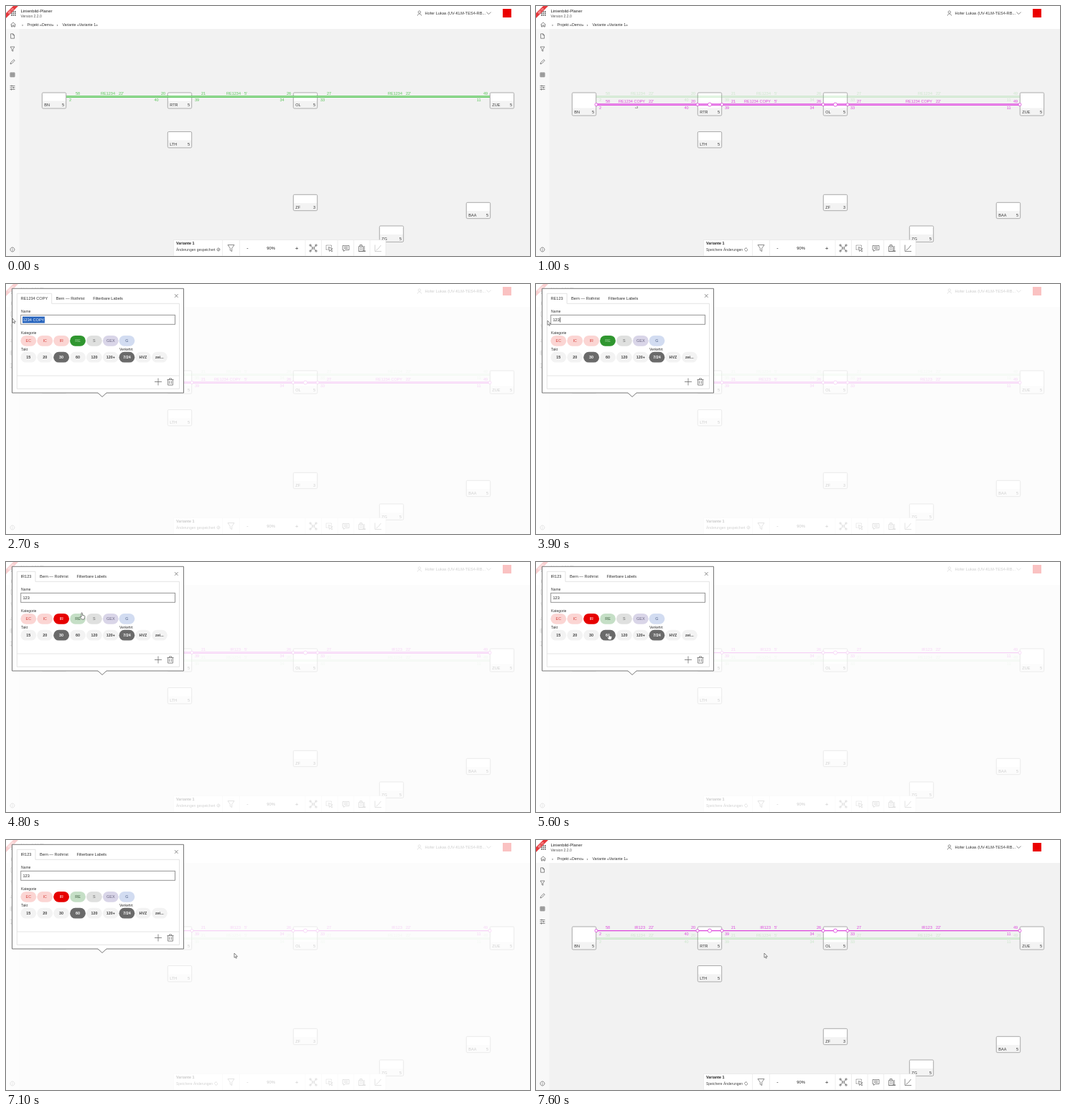
Recreate the animation shown at these times as an HTML page. Size 730 px wide and 349 px high, loop 7700 ms.

```html
<!DOCTYPE html>
<html lang="de">
<head>
<meta charset="utf-8">
<title>Linienbild-Planer</title>
<style>
html, body { margin: 0; width: 100%; height: 100%; overflow: hidden; background: #fff; }
svg { position: fixed; left: 0; top: 0; display: block; }
text { font-family: "Liberation Sans", Arial, sans-serif; white-space: pre; }
.icon { fill: none; stroke: #666; stroke-width: .75; }
</style>
</head>
<body>
<svg width="730" height="349" viewBox="0 0 730 349">
  <g id="page"></g>
  <g id="net"></g>
  <g id="bar"></g>
  <rect id="veil" width="730" height="349" fill="#fff"/>
  <g id="dialog"></g>
  <g id="pointer"></g>
</svg>
<script>
const LOOP = 7700, STEP = 100;
const COPY = 600, OPEN = 1200, SAVED = 1600, DRAG = 2100, DRAG_END = 2500;
const TYPE = [3300, 3500, 3700], PICK_IR = 4400, PICK_60 = 5300, CLOSE = 7200;
const PINK = '#dc45dc', GREEN = '#55c455';
const ROW1 = 126.6, ROW2 = 137.6;

const layer = id => document.getElementById(id);
const pen = document.createElement('canvas').getContext('2d');
function widthOf(s, size) {
  pen.font = '100px "Liberation Sans", Arial, sans-serif';
  return pen.measureText(s).width * size / 100;
}

// y is the vertical middle of the capitals
function text(s, x, y, size = 5.7, fill = '#333', extra = '') {
  return `<text x="${x}" y="${y + size * .36}" font-size="${size}" fill="${fill}" ${extra}>${s}</text>`;
}
const MID = 'text-anchor="middle"', END = 'text-anchor="end"', BOLD = 'font-weight="bold"';
function rect(x, y, w, h, fill, extra = '') {
  return `<rect x="${x}" y="${y}" width="${w}" height="${h}" fill="${fill}" ${extra}/>`;
}
function icon(x, y, d, extra = '') {
  return `<path class="icon" transform="translate(${x} ${y})" d="${d}" ${extra}/>`;
}
function line(x1, y1, x2, y2, color, w = 1) {
  return `<path d="M${x1} ${y1}L${x2} ${y2}" stroke="${color}" stroke-width="${w}" fill="none"/>`;
}
function ring(x, y, r, color) {
  return `<circle cx="${x}" cy="${y}" r="${r}" fill="#fff" stroke="${color}" stroke-width=".8"/>`;
}

const FUNNEL = 'M-3-3H3L.8.2V3.2L-.8 2.4V.2Z';

function drawPage() {
  let dots = '';
  for (let i = 0; i < 9; i++)
    dots += rect(7 + i % 3 * 2.5, 7 + Math.floor(i / 3) * 2.5, 1.6, 1.6, '#555');
  return rect(0, 0, 730, 349, '#f2f2f2') + rect(0, 0, 730, 32, '#fff') + rect(0, 32, 18.5, 317, '#f8f8f8') +
    dots +
    '<path d="M0 10L10 0H17L0 17Z" fill="#e5383c"/>' +
    text('BETA', 0, 0, 4, '#fff', `${MID} transform="translate(6.7 6.7) rotate(-45)"`) +
    text('Linienbild-Planer', 20.5, 7, 5.9, '#222') +
    text('Version 2.2.0', 20.5, 14.5, 5, '#555') +
    icon(576, 10, 'M-2.5 3.5C-2.5 0 2.5 0 2.5 3.5M0-3.2A1.7 1.7 0 1 1-.1-3.2Z') +
    text('Hofer Lukas (UV-KLM-TES4-RB...', 583.5, 10, 5.6) +
    icon(672.5, 10, 'M-3-1.5L0 1.5L3-1.5') +
    rect(692, 4, 12, 12, '#eb0000') +
    icon(10, 26, 'M-3.5 0L0-3L3.5 0M-2.5-.5V3H-.8V.8H.8V3H2.5V-.5') +
    text('›', 22, 25.6, 6) + text('Projekt «Demo»', 29.5, 26, 5.2) +
    text('›', 70.5, 25.6, 6) + text('Variante «Variante 1»', 78.5, 26, 5.2) +
    icon(9, 42, 'M-2.4-3.2H.8L2.6-1.2V3.2H-2.4ZM.8-3.2V-1.2H2.6') +
    icon(9, 60, FUNNEL) +
    icon(9, 78, 'M-3 3L-2.3.8L1.8-3.2L3.2-1.8L-.8 2.3Z') +
    icon(9, 96, 'M-3-2.8H3V2.8H-3ZM-3-.9H3M-3 .9H3M-1-2.8V2.8M1-2.8V2.8', 'stroke-width=".6"') +
    icon(9, 114, 'M-3.5-2.5H3.5M-3.5 0H3.5M-3.5 2.5H3.5M-1-3.6V-1.4M1.5-1.1V1.1M-1.5 1.4V3.6') +
    icon(9, 340, 'M0-3A3 3 0 1 1-.1-3ZM0-.5V1.6M0-1.7V-1.1');
}

function drawNode([name, x, y, time], h) {
  return rect(x + .3, y, 33.4, h, '#fff', 'rx="1.5"') +
    rect(x + .8, y + h - 10.5, 32.4, 10, '#f3f3f3') +
    rect(x + .3, y, 33.4, h, 'none', 'rx="1.5" stroke="#a6a6a6" stroke-width=".95"') +
    text(name, x + 3.3, y + h - 4.8, 5.5, '#333') + text(time, x + 31, y + h - 4.8, 5.5, '#333', END);
}

const HUBS = [['BN', 50, 121, 5], ['RTR', 225, 121, 5], ['OL', 400, 121, 5], ['ZUE', 674, 121, 5]];
const OTHERS = [['LTH', 225, 175.5, 5], ['ZF', 400, 263.3, 3], ['BAA', 641, 274.3, 5], ['ZG', 520, 307, 5]];
// start x, end x, departure, arrival, return arrival, return departure, minutes, name end
const LEGS = [
  [84, 225, 58, 20, 2, 40, 22, 152],
  [259, 400, 21, 26, 39, 34, 5, 327],
  [434, 674, 27, 49, 33, 11, 22, 552]
];

function drawTrain(name, y, color, { thick = true, picked = false, faded = false }) {
  let s = line(84, y, 674, y, color, thick ? 2.8 : 1.3);
  if (thick) s += line(84, y, 674, y, '#fff', .5);
  for (const [a, b, dep, arr, back, from, min, end] of LEGS) {
    const up = y - 4.7, down = y + 4.5;
    s += text(dep, a + 13, up, 5.5, color) + text(arr, b - 3, up, 5.5, color, END) +
      text(back, a + 4, down, 5.5, color) + text(from, b - 12.5, down, 5.5, color, END) +
      text(name, end, up, 5.5, color, END) + text(min + "'", end + 5, up, 5.5, color);
    if (picked) s += ring(a, y, 2, color) + ring(b, y, 2, color);
  }
  if (picked) s += ring(242, y, 2.6, color) + ring(417, y, 2.6, color);
  return `<g opacity="${faded ? .25 : 1}">${s}</g>`;
}

function drawNet(st) {
  let s = HUBS.map(n => drawNode(n, st.copied ? 32 : 22)).join('') +
    OTHERS.map(n => drawNode(n, 22.4)).join('');
  const top = st.cat === 'IR';
  s += drawTrain('RE1234', top ? ROW2 : ROW1, GREEN, { faded: st.copied });
  if (st.copied)
    s += drawTrain(st.cat + st.name, top ? ROW1 : ROW2, PINK, { thick: st.takt === '30', picked: true });
  return s;
}

function drawBar(st) {
  const note = st.saving ? 'Speichere Änderungen' : 'Änderungen gespeichert';
  const end = 239.5 + widthOf(note, 5);
  let s = rect(233.5, 326.7, 295.5, 22.3, '#fff', 'stroke="#e4e4e4" stroke-width=".6"');
  for (const x of [301.5, 325.5, 417, 439.5, 462, 484.5, 507]) s += line(x, 327, x, 349, '#e8e8e8', .7);
  return s + text('Variante 1', 237, 331.4, 5.4, '#222', BOLD) + text(note, 237, 339.7, 5, '#444') +
    icon(end + 2, 340, st.saving ? 'M-2 .4A2 2 0 0 1 1.6-1.2M2-.4A2 2 0 0 1-1.6 1.2' : 'M0-2A2 2 0 1 1-.1-2ZM-.9 0L-.2.8L1-.8', 'stroke-width=".6"') +
    icon(313.5, 338, 'M-4.5-4.5H4.5L1.2.2V4.5L-1.2 3.2V.2Z') +
    text('-', 336.5, 337.5, 7, '#222', MID) + text('90%', 369, 337.7, 5.8, '#222', MID) +
    text('+', 405, 337.7, 8, '#222', MID) +
    icon(428, 338, 'M-4-4L-1.2-1M4-4L1.2-1M-4 4L-1.2 1M4 4L1.2 1M-1.5-1H1.5V1H-1.5ZM-5-5H-3V-3H-5ZM3-5H5V-3H3ZM-5 3H-3V5H-5ZM3 3H5V5H3Z') +
    icon(450.5, 338, 'M-4.5 2V-4H3V-1M-4.5 2H-1', 'stroke-dasharray="1.4 .8"') +
    icon(450.5, 338, 'M-1-1.5L4.5 1L2.3 1.8L4.3 4.2L3.3 5L1.4 2.7L0 4.5Z') +
    icon(473.5, 338, 'M-4.5-3.5H4.5V2.5H-1L-3 4.5V2.5H-4.5ZM-2.7-1.5H2.7M-2.7.5H2.7') +
    icon(496, 338, 'M-4.5 4.5V-2.5H1.5V4.5ZM-3-2.5V-4.5H0V-2.5M-3-.3H0M-3 2H0M3.2-3V4.5M2 3.2L3.2 4.5L4.4 3.2M-5 4.5H5') +
    icon(518.5, 338, 'M-4.5-4.5V4.5H4.5M-3 3L0 1L3.8-4', st.copied ? '' : 'opacity=".4"');
}

const PILL_X = [31.3, 54.2, 77.1, 100, 122.9, 145.8, 168.4, 191, 213.9];
function pill(label, i, y, bg, fg, extra = '') {
  return rect(PILL_X[i] - 10.9, y - 7.4, 21.8, 14.8, bg, 'rx="7.4"') +
    text(label, PILL_X[i], y, 5.4, fg, MID + ' ' + extra);
}
// label, fill, ink, fill when chosen
const CATS = [
  ['EC', '#fbd5d3', '#d8433f', '#e60000'], ['IC', '#fbd5d3', '#d8433f', '#e60000'],
  ['IR', '#fbd5d3', '#d8433f', '#e60000'], ['RE', '#c5dfc6', '#3a5a3c', '#2f962f'],
  ['S', '#dfe0df', '#666', '#666'], ['GEX', '#d9d5e8', '#6a6580', '#666'], ['G', '#d2dcf1', '#4d5e85', '#446']
];
const TAKTS = ['15', '20', '30', '60', '120', '120+', '7/24', 'HVZ', 'zei...'];

function drawDialog(st) {
  if (!st.open) return '';
  const title = st.cat + st.name, edge = 26 + widthOf(title, 5.6);
  const nameW = widthOf(st.name, 5.6);
  let s = '<path d="M8.5 6.3H247.5V152H140L134 157.5L128 152H8.5Z" fill="#fff" stroke="#777"/>' +
    `<path d="M15.3 27V13.3H${edge}V27.3H241.5V146.3H15.3Z" fill="none" stroke="#ddd" stroke-width=".8"/>` +
    line(15.5, 128, 241.5, 128, '#ddd', .8) +
    text(title, 20.5, 20, 5.6) + text('Bern — Rothrist', edge + 6, 20, 5.6) +
    text('Filterbare Labels', edge + 57.5, 20, 5.6) +
    icon(237.3, 16.5, 'M-2.3-2.3L2.3 2.3M2.3-2.3L-2.3 2.3') +
    text('Name', 21, 38, 5) + rect(20.7, 43.3, 214.8, 13, '#fff', 'stroke="#888" stroke-width=".9"');
  if (st.marked > 0) {
    const w = (nameW + 1) * st.marked;
    s += rect(24 + nameW - w, 45.5, w, 9, '#2764bd');
  }
  s += text(st.name, 23.5, 50, 5.6, st.marked > .6 ? '#fff' : '#222');
  if (st.caret) s += line(24.3 + nameW, 46.5, 24.3 + nameW, 53.5, '#222', .7);
  s += text('Kategorie', 21, 68, 5) + text('Takt', 21, 91, 5) + text('Verkehrt', 158, 91, 5);
  CATS.forEach(([label, bg, ink, on], i) => {
    const chosen = label === st.cat;
    s += pill(label, i, 79.3, chosen ? on : bg, chosen ? (label === 'RE' ? '#a6d8a6' : '#fff') : ink);
  });
  TAKTS.forEach((label, i) => {
    const chosen = label === st.takt || label === '7/24';
    s += pill(label, i, 102.2, chosen ? '#6a6a6a' : '#f3f3f3', chosen ? '#fff' : '#444', BOLD);
  });
  return s + icon(212, 136.5, 'M-5 0H5M0-5V5') +
    icon(229, 136.5, 'M-4.5-3H4.5M-1.5-3V-4.6H1.5V-3M-3.4-3V4.6H3.4V-3M-1.3-1.2V2.8M1.3-1.2V2.8');
}

// time, x, y of the pointer tip
const TRACK = [
  [400, 160, 180], [800, 140, 142], [1200, 140, 142], [1700, 95.5, 93], [2100, 57, 49], [2500, 9, 48], [3800, 9, 48],
  [4300, 77, 78], [4500, 77, 78], [4800, 105, 71], [5200, 100, 100], [5500, 100, 100],
  [6400, 126, 89], [7100, 318, 158], [LOOP, 318, 158]
];
const ARROW = 'M0 0V6.2L1.4 5L2.4 7.2L3.4 6.7L2.5 4.6H4.4Z';
const HAND = 'M0 0C.9-.5 1.4 0 1.4.8V3.4L4.2 4C5 4.2 5 5 4.8 6L4 9H.6L-1.9 5.8C-2 5 -1.2 4.8 0 6Z';

function drawPointer(t) {
  if (t < TRACK[0][0]) return '';
  const i = TRACK.findIndex(k => k[0] > t);
  const [t0, x0, y0] = TRACK[i - 1], [t1, x1, y1] = TRACK[i];
  let p = (t - t0) / (t1 - t0);
  p = p * p * (3 - 2 * p);
  const x = x0 + (x1 - x0) * p, y = y0 + (y1 - y0) * p;
  if (t >= 800 && t < OPEN) return text('+2', x, y, 4, '#333', MID);
  const hand = x > 20 && x < 225 && y > 70 && y < 110 && t >= 1500 && t < 6000;
  return `<path transform="translate(${x} ${y})" d="${hand ? HAND : ARROW}" fill="#fff" stroke="#555" stroke-width=".7"/>`;
}

const clamp = v => Math.max(0, Math.min(1, v));
function stateAt(t) {
  const typed = TYPE.filter(k => t >= k).length;
  return {
    copied: t >= COPY,
    open: t >= OPEN && t < CLOSE,
    saving: t >= COPY && t < SAVED || t >= PICK_60,
    name: typed ? '123'.slice(0, typed) : '1234 COPY',
    cat: t >= PICK_IR ? 'IR' : 'RE',
    takt: t >= PICK_60 ? '60' : '30',
    marked: typed ? 0 : clamp((t - DRAG) / (DRAG_END - DRAG)),
    caret: t < DRAG || typed > 0 && t < PICK_IR
  };
}

function update(id, markup) {
  const el = layer(id);
  if (el.markup !== markup) el.innerHTML = el.markup = markup;
}

function render(t) {
  const st = stateAt(t);
  update('net', drawNet(st));
  update('bar', drawBar(st));
  update('dialog', drawDialog(st));
  update('pointer', drawPointer(t));
  const veil = t < CLOSE ? clamp((t - OPEN + STEP) / 400) : clamp((CLOSE + 300 - t) / 400);
  layer('veil').setAttribute('opacity', .76 * veil);
}

update('page', drawPage());
const start = performance.now();
function tick() {
  const t = (performance.now() - start) % LOOP;
  render(Math.floor(t / STEP) * STEP);
  requestAnimationFrame(tick);
}
tick();
</script>
</body>
</html>
```
